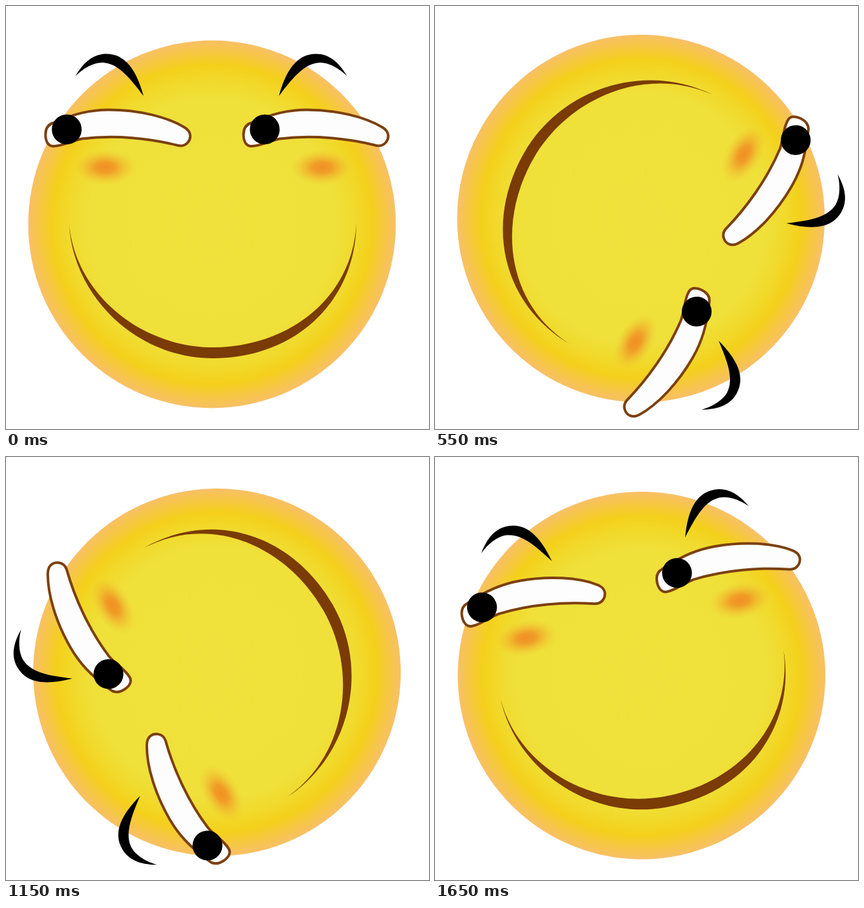
Write an HTML page that moves like this. It is 658 by 658 pixels and loops after 1700 ms.

```html
<!DOCTYPE html>
<html lang="en">
<head>
<meta charset="utf-8">
<title>Rolling smiley</title>
<style>
  html, body { margin: 0; height: 100%; overflow: hidden; background: #fff; }
  svg { display: block; width: 100vw; height: 100vh; }
</style>
</head>
<body>
<svg viewBox="0 0 658 658">
  <defs>
    <radialGradient id="skin">
      <stop offset="0" stop-color="#f0e13c"/>
      <stop offset=".68" stop-color="#efe03a"/>
      <stop offset=".78" stop-color="#f1da2c"/>
      <stop offset=".87" stop-color="#f4d01b"/>
      <stop offset=".93" stop-color="#f6c83e"/>
      <stop offset="1" stop-color="#f8c066"/>
    </radialGradient>
    <radialGradient id="blush">
      <stop offset="0" stop-color="#f18f23"/>
      <stop offset=".3" stop-color="#f19425" stop-opacity=".88"/>
      <stop offset=".65" stop-color="#f1a82a" stop-opacity=".42"/>
      <stop offset="1" stop-color="#f0c632" stop-opacity="0"/>
    </radialGradient>
    <g id="eye">
      <path fill="#fdfdfd" stroke="#7b400f" stroke-width="4" d="M75 218C66 219 62 211 61.500 202C61 192 64 185 73 182C107 167 132 161.500 160 161.500C205 161.500 250 172 278 189C289 196 288 206 283 212C279 217 273 218 268 217C225 206 170 200 118 206.500C100 210 88 218 75 218Z"/>
      <circle cx="94.500" cy="192" r="23.200"/>
    </g>
    <path id="brow" d="M108 109C122 85 138 74.500 156 74.500C186 74.500 203 100 214 140C190 108 173 89 150 88C136 88 120 97 108 109Z"/>
    <ellipse id="cheek" cy="251" rx="49" ry="28" fill="url(#blush)"/>
  </defs>
  <g id="face">
    <circle cx="320.500" cy="339.500" r="285.900" fill="url(#skin)"/>
    <use href="#cheek" x="154"/>
    <use href="#cheek" x="491.500"/>
    <path fill="#7a3b06" d="M98 338C104 452 203 548 322 548C449 548 544 460 545 338C539 457 436 531 322 531C212 531 108 450 98 338Z"/>
    <use href="#eye"/>
    <use href="#eye" x="308"/>
    <use href="#brow"/>
    <use href="#brow" transform="translate(638.500) scale(-1 1)"/>
  </g>
</svg>
<script>
  const STEP = 50, COUNT = 34;
  const face = document.getElementById('face');

  // Ten degrees per step, with two double steps completing the turn.
  const angleAt = i => 10 * (i + (i >= 4) + (i >= 26));

  function draw() {
    const i = Math.floor(performance.now() / STEP) % COUNT;
    face.setAttribute('transform', `rotate(${angleAt(i)} 323 335)`);
    requestAnimationFrame(draw);
  }
  draw();
</script>
</body>
</html>
```
